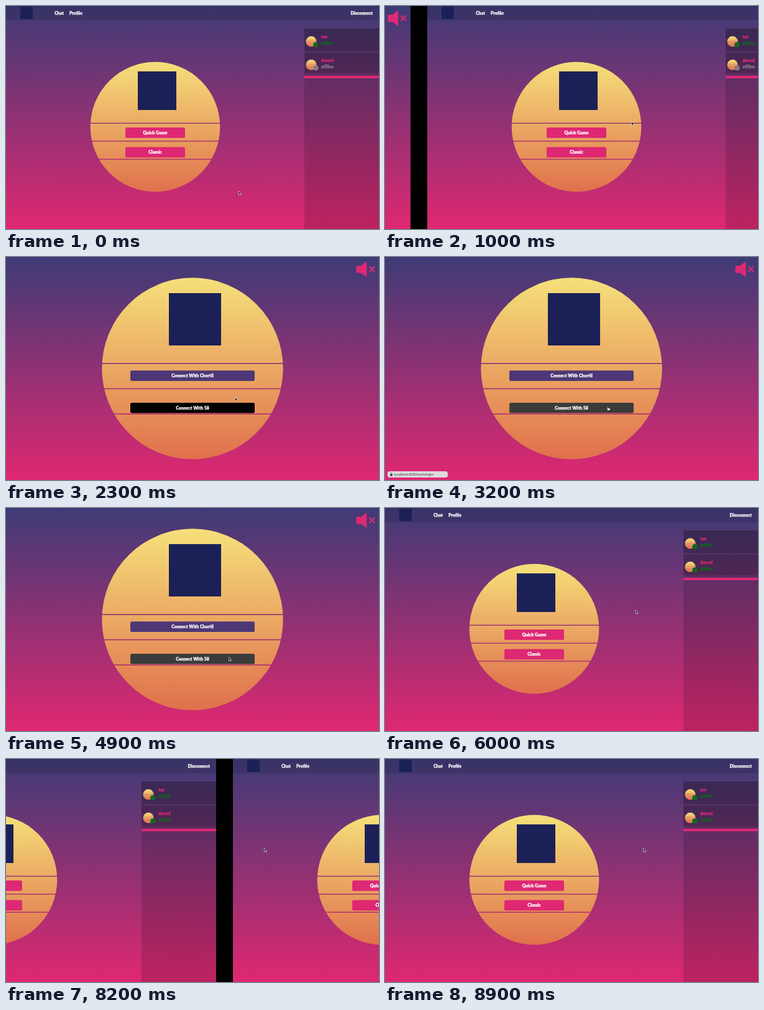
These frames come from a looping animation (600 px wide and 358 px high, 9 s). An HTML page:

```html
<!DOCTYPE html>
<html lang="en">
<head>
<meta charset="utf-8">
<style>
html, body { margin: 0; width: 100%; height: 100%; overflow: hidden; background: #000; }
svg { display: block; width: 100vw; height: 100vh; }
text {
  font: 900 7px Lato, "Open Sans", sans-serif;
  color: #fff; fill: currentColor; stroke: currentColor; stroke-width: .25;
}
.mid { text-anchor: middle; }
.pink { color: #de2873; fill: currentColor; }
.on { color: #0d6a1b; fill: currentColor; }
.off { color: #85798a; fill: currentColor; }
.logo { fill: #1b2157; }
.url { font: 5.3px "Open Sans", sans-serif; color: #333; stroke: none; }
</style>
</head>
<body>
<svg id="stage" viewBox="0 0 600 358"></svg>
<script>
const rect = (x, y, w, h, fill, extra = '') =>
  `<rect x="${x}" y="${y}" width="${w}" height="${h}" fill="${fill}" ${extra}/>`;
const text = (x, y, str, cls = '') => `<text x="${x}" y="${y}" class="${cls}">${str}</text>`;
const logo = (cx, cy, size) => rect(cx - size / 2, cy - size / 2, size, size, '', 'class="logo"');
const button = (x, y, w, fill, label, id = '') =>
  rect(x, y, w, 16.7, fill, `rx="2.5" id="${id}"`) + text(x + w / 2, y + 10.7, label, 'mid');

// Sun disc crossed by stripes that let the backdrop through
const sun = (cx, cy, r, stripes, thick) =>
  `<circle cx="${cx}" cy="${cy}" r="${r}" fill="url(#sun)"/>` + stripes.map(y => {
    const half = Math.sqrt(r * r - (y - cy) ** 2) + .5;
    return rect(cx - half, y - thick / 2, half * 2, thick, 'url(#bg)');
  }).join('');

const friend = (y, height, name, status) => {
  const cls = status === 'online' ? 'on' : 'off';
  const mid = y + height / 2;
  return rect(480, y, 120, height, '#000', 'opacity=".16"') +
    sun(491, mid + 3, 8.5, [], 0) +
    [2, 4.5, 7].map(d => rect(483.5, mid + d, 15, .4, '#c75a68')).join('') +
    `<circle cx="498.5" cy="${mid + 8}" r="4.3" class="${cls}"/>` +
    text(507, mid - 2, name, 'pink') +
    text(507, mid + 8, status, cls);
};

const backdrop = rect(0, 0, 600, 358, 'url(#bg)');

const home = status => backdrop +
  rect(0, 0, 600, 23, '#000', 'opacity=".13"') +
  logo(33, 11, 20) +
  text(78, 14, 'Chat') + text(102, 14, 'Profile') + text(554.5, 14, 'Disconnect') +
  sun(240, 194, 104.3, [188.2, 217, 246], 1.4) +
  logo(243, 136, 62) +
  button(192, 195, 96, '#de2873', 'Quick Game') +
  button(192, 226.5, 96, '#de2873', 'Classic') +
  rect(480, 36, 120, 322, '#000', 'opacity=".15"') +
  friend(36, 36, 'tav', 'online') +
  friend(75, 33, 'dorvel', status) +
  rect(480, 112, 120, 4, '#de2873');

const login = backdrop +
  sun(300, 179, 145.7, [171, 211.5, 252], 1.6) +
  logo(304, 100, 84) +
  button(200, 182.3, 200, '#4d3776', 'Connect With Chortil') +
  button(200, 233.9, 200, '#000', 'Connect With 58', 'signIn') +
  `<path class="pink" d="M565 14h6l8-6q1.300-.8 1.300 .8v22q0 1.600-1.300 .8l-8-6h-6q-1.500 0-1.500-1.500v-8.600q0-1.500 1.500-1.500z"/>
   <path d="M585 16l7.300 7.300m0-7.300l-7.300 7.300" stroke="#de2873" stroke-width="2.300" stroke-linecap="round"/>`;

stage.innerHTML = `
<defs>
  <linearGradient id="bg" gradientUnits="userSpaceOnUse" x1="0" y1="0" x2="0" y2="358">
    <stop stop-color="#3e3b76"/><stop offset="1" stop-color="#df2871"/>
  </linearGradient>
  <linearGradient id="sun" x1="0" y1="0" x2="0" y2="1">
    <stop stop-color="#f5e07a"/><stop offset="1" stop-color="#e0704c"/>
  </linearGradient>
</defs>
<rect width="600" height="358"/>
<g id="left">
  <g id="loginPage">${login}</g>
  <g id="leftHome">${home('online')}</g>
</g>
<g id="right">
  <g id="before">${home('offline')}</g>
  <g id="after">${home('online')}</g>
</g>
<g id="hint">
  ${rect(4, 344, 97, 10, '#dcdadd', 'rx="4"')}
  ${rect(8.3, 348.6, 3.6, 3, '#333', 'rx=".4"')}
  <path d="M9 348.600v-1a1.100 1.100 0 0 1 2.200 0v1" fill="none" stroke="#333" stroke-width=".6"/>
  ${text(15, 351, 'localhost:8090/auth/login', 'url')}
</g>
<g id="pointer" stroke-width=".6" stroke-linejoin="round">
  <path id="arrow" fill="#111" stroke="#fff" d="M0 0V6L1.400 4.700 2.300 6.900 3.400 6.400 2.500 4.400H4.300Z"/>
  <path id="hand" fill="#fff" stroke="#111" d="M-.7 1.200q.7-.8 1.300 0v2l2.800 .6q.6 .4 .4 1.300l-.6 2.300h-3l-2-2.700q0-.9 1.100-.2z"/>
</g>`;

const LOOP = 9000, PITCH = 627;
const LOGGED_IN = 5200, HOVER = 2400, HINT_ON = 2650, HINT_OFF = 4200;

// time, x, y
const path = [[100, 374.5, 297], [850, 396.5, 185.5], [1700, 396.5, 185.5],
  [2600, 358.5, 239.2], [5300, 358.5, 239.2], [6300, 415.5, 143]];

// Critically damped settle from 0 to 1
const settle = ms => {
  const x = Math.max(0, ms) * .0119;
  return 1 - (1 + x) * Math.exp(-x);
};

const pointerAt = t => {
  const i = path.findIndex(k => k[0] > t);
  if (i < 1) return path[i ? path.length - 1 : 0].slice(1);
  const [a, b] = [path[i - 1], path[i]];
  const u = (t - a[0]) / (b[0] - a[0]), e = u * u * (3 - 2 * u);
  return [1, 2].map(n => a[n] + (b[n] - a[n]) * e);
};

const show = (el, on) => el.style.display = on ? '' : 'none';
const move = (el, x, y) => el.setAttribute('transform', `translate(${x} ${y})`);

function draw(now) {
  const t = now % LOOP;
  const x = -Math.round(PITCH * (1 - settle(t - 954) + settle(t - 8081)));
  move(left, x, 0);
  move(right, x + PITCH, 0);
  move(pointer, ...pointerAt(t));

  const loggedIn = t >= LOGGED_IN, linked = t >= HINT_ON && t < HINT_OFF;
  show(loginPage, !loggedIn);
  show(leftHome, loggedIn);
  show(before, !loggedIn);
  show(after, loggedIn);
  show(hint, linked);
  show(hand, linked);
  show(arrow, !linked);
  signIn.setAttribute('fill', t >= HOVER ? '#3b3b3b' : '#000');
  requestAnimationFrame(draw);
}
requestAnimationFrame(draw);
</script>
</body>
</html>
```
